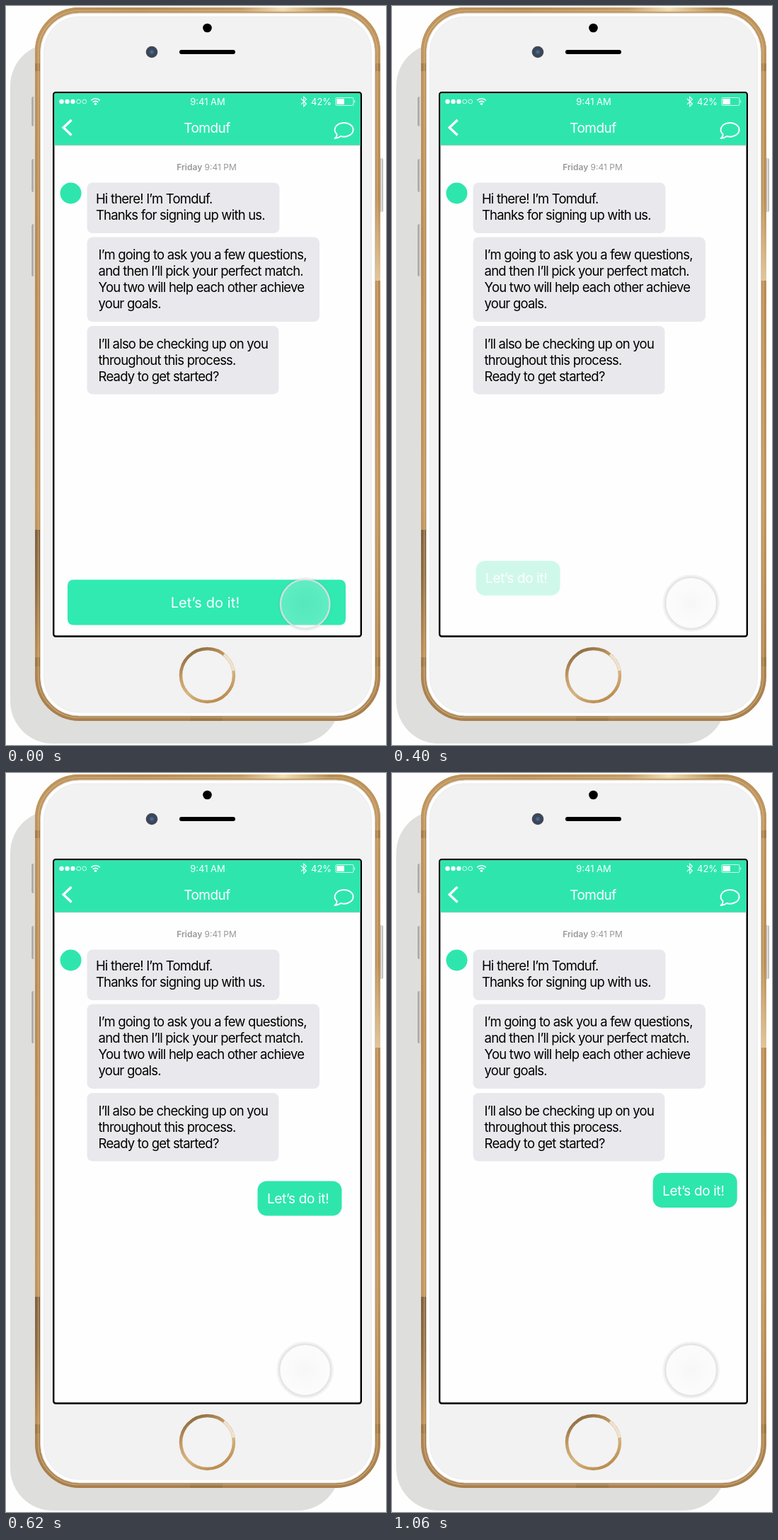
An HTML page for the animation above (2.4 s loop, 537 by 1044 pixels).

```html
<!DOCTYPE html>
<html lang="en">
<head>
<meta charset="utf-8">
<title>Chat reply</title>
<style>
  html, body { margin: 0; width: 100%; height: 100%; overflow: hidden; background: #fefefe; }
  svg { display: block; width: 537px; height: 1044px; }
  text { font: 18.5px Inter, "Open Sans", sans-serif; letter-spacing: -.79px; }
  .white { fill: #fff; }
  .line { fill: none; stroke: #fff; }
  .status { font-size: 13px; letter-spacing: 0; }
  .date { font-size: 12px; letter-spacing: 0; fill: #98989c; }
  .mid { text-anchor: middle; }
</style>
</head>
<body>
<svg viewBox="0 0 537 1044">
  <defs>
    <linearGradient id="gold" x2="0" y2="1">
      <stop offset="0" stop-color="#c0965f"/>
      <stop offset=".35" stop-color="#ba8c55"/>
      <stop offset=".7" stop-color="#c2965f"/>
      <stop offset="1" stop-color="#a87f4c"/>
    </linearGradient>
    <linearGradient id="top">
      <stop offset="0" stop-color="#c0965f"/>
      <stop offset=".3" stop-color="#b78c55"/>
      <stop offset=".6" stop-color="#c59d67"/>
      <stop offset=".72" stop-color="#f3e1b8"/>
      <stop offset=".86" stop-color="#b58c50"/>
      <stop offset="1" stop-color="#c0965f"/>
    </linearGradient>
    <linearGradient id="dark" x2="0" y2="1">
      <stop offset="0" stop-color="#80623f"/>
      <stop offset=".4" stop-color="#8f6d43"/>
      <stop offset="1" stop-color="#bd9058"/>
    </linearGradient>
    <linearGradient id="shine" x2="0" y2="1">
      <stop offset="0" stop-color="#f3dfb8" stop-opacity="0"/>
      <stop offset="1" stop-color="#f3dfb8" stop-opacity=".7"/>
    </linearGradient>
    <linearGradient id="metal">
      <stop offset="0" stop-color="#8c8c8c"/>
      <stop offset=".6" stop-color="#e2e2e2"/>
      <stop offset="1" stop-color="#aaa"/>
    </linearGradient>
    <linearGradient id="ring" x1=".2" y1="0" x2=".7" y2="1">
      <stop offset="0" stop-color="#89683f"/>
      <stop offset=".35" stop-color="#c49b63"/>
      <stop offset=".65" stop-color="#d6b582"/>
      <stop offset="1" stop-color="#b98b4d"/>
    </linearGradient>
    <radialGradient id="lens">
      <stop offset="0" stop-color="#57749b"/>
      <stop offset=".5" stop-color="#35465f"/>
      <stop offset="1" stop-color="#45484f"/>
    </radialGradient>
    <radialGradient id="glass">
      <stop offset="0" stop-color="#dcdcdc" stop-opacity=".22"/>
      <stop offset=".5" stop-color="#ececec" stop-opacity=".22"/>
      <stop offset="1" stop-color="#f6f6f6" stop-opacity=".25"/>
    </radialGradient>
  </defs>

  <!-- Phone -->
  <rect x="6" y="53" width="466" height="989" rx="60" fill="#dededd"/>
  <g fill="url(#metal)">
    <rect x="36.500" y="128" width="6" height="42" rx="2"/>
    <rect x="36.500" y="216" width="6" height="47" rx="2"/>
    <rect x="36.500" y="308" width="6" height="74" rx="2"/>
    <rect x="527" y="215" width="6" height="76" rx="2"/>
  </g>
  <rect x="41" y="2" width="488" height="1008" rx="62" fill="url(#gold)"/>
  <path d="M44 64A59 59 0 0 1 103 5H467A59 59 0 0 1 526 64" fill="none" stroke="url(#top)" stroke-width="6"/>
  <path d="M41 740h8v180h-8z" fill="url(#dark)"/>
  <path d="M521 270h8v118h-8z" fill="url(#shine)"/>
  <path d="M41 81h8v11h-8zM521 81h8v11h-8zM41 920h8v13h-8zM521 920h8v13h-8z" fill="#94703f" opacity=".55"/>
  <path d="M260 1003h46v7h-46z" fill="#94703f" opacity=".5"/>
  <rect x="45.500" y="6.500" width="479" height="999" rx="58" fill="none" stroke="#e0c498" stroke-width="1.200" opacity=".6"/>
  <rect x="48.500" y="10" width="473" height="993" rx="55" fill="#fff" stroke="#d5cbbb"/>
  <rect x="53.500" y="15" width="463" height="983" rx="50" fill="#f2f2f2" stroke="#ececec"/>
  <circle cx="284.500" cy="31" r="6.300"/>
  <circle cx="206" cy="65" r="8.300" fill="url(#lens)"/>
  <rect x="245" y="62" width="79" height="6" rx="3"/>
  <circle cx="284.500" cy="945.500" r="37.500" fill="#f3f3f3" stroke="url(#ring)" stroke-width="4.500"/>
  <path d="M308 916.300A37.500 37.500 0 0 1 321.500 939" fill="none" stroke="#eee3cf" stroke-width="4"/>

  <!-- Screen -->
  <rect x="67.200" y="122.200" width="434.600" height="768.300" rx="3" fill="#fefefe" stroke="#000" stroke-width="2.400"/>
  <rect x="68.400" y="123.400" width="432.200" height="73.600" fill="#2ee6ad"/>
  <path d="M68.400 196.700H500.600" stroke="#93c9b5"/>

  <g class="white">
    <circle cx="78.500" cy="135" r="3.200"/>
    <circle cx="86.500" cy="135" r="3.200"/>
    <circle cx="94.500" cy="135" r="3.200"/>
    <circle cx="126.500" cy="138.300" r="1.700"/>
    <rect x="467.500" y="131" width="10.500" height="8"/>
    <path d="M492.300 133q2.200 2 0 4z"/>
    <text class="status mid" x="285" y="140">9:41 AM</text>
    <text class="status" x="431" y="140">42%</text>
    <text class="mid" x="284" y="178.500" style="font-size:19px;letter-spacing:-.5px">Tomduf</text>
  </g>
  <g class="line">
    <circle cx="102.700" cy="135" r="2.900" stroke-width=".8"/>
    <circle cx="110.700" cy="135" r="2.900" stroke-width=".8"/>
    <path d="M120.300 133.300a8.800 8.800 0 0 1 12.400 0M122.800 135.800a5.300 5.300 0 0 1 7.400 0" stroke-width="1.700"/>
    <path d="M417 131l7.500 7-3.700 3.800v-13.600l3.700 3.600-7.500 7" stroke-width="1.100"/>
    <rect x="466" y="129.500" width="25" height="11" rx="1.500" stroke-width=".8"/>
    <path d="M92.500 161l-11.300 10.700 11.300 10.700" stroke-width="3.400"/>
    <path d="M467.500 181A13 9.800 0 1 1 473 184Q469 187 464.500 187Q468 184.500 467.500 181Z" stroke-width="1.900" stroke-linejoin="round"/>
  </g>

  <text class="date mid" x="283.500" y="232"><tspan font-weight="600">Friday</tspan> 9:41 PM</text>
  <circle cx="91.500" cy="264.500" r="15" fill="#2ee6ad"/>

  <g id="messages"></g>

  <rect id="button" x="87" y="810.500" width="393" height="64" rx="8" fill="#30eab2"/>
  <text id="label" class="white mid" x="281.500" y="850" style="font-size:20px;letter-spacing:.1px">Let’s do it!</text>

  <g id="reply">
    <rect width="119" height="49" rx="13" fill="#2de6ac"/>
    <text class="white" x="13.500" y="31.500" style="font-size:19px;letter-spacing:-.35px">Let’s do it!</text>
  </g>

  <g id="touch">
    <circle r="36.500" fill="none" stroke="#888c90" stroke-opacity=".1" stroke-width="5"/>
    <circle r="35.500" fill="url(#glass)" stroke="#e2e3e6" stroke-opacity=".85" stroke-width="2.300"/>
  </g>
</svg>

<script>
  const $ = id => document.getElementById(id);

  // Each message: top, width, height, text x, first baseline, lines
  const messages = [
    [249.5, 272, 71.5, 126.9, 279, ["Hi there! I’m Tomduf.", "Thanks for signing up with us."]],
    [326.5, 328.5, 119.5, 130.6, 357.7, ["I’m going to ask you a few questions,", "and then I’ll pick your perfect match.",
      "You two will help each other achieve", "your goals."]],
    [452, 271, 96.5, 130.6, 484.3, ["I’ll also be checking up on you", "throughout this process.", "Ready to get started?"]]
  ];
  $("messages").innerHTML = messages.map(([y, w, h, x, base, lines]) =>
    `<rect x="114.500" y="${y}" width="${w}" height="${h}" rx="8" fill="#e9e9ed"/>` +
    lines.map((line, i) => `<text x="${x}" y="${base + 23 * i}">${line}</text>`).join("")
  ).join("");

  const LOOP = 2400, SEND = 390;

  // The standard CSS "ease" curve, cubic-bezier(.25, .1, .25, 1)
  function ease(x) {
    if (x <= 0) return 0;
    if (x >= 1) return 1;
    let low = 0, high = 1, s;
    for (let i = 0; i < 20; i++) {
      s = (low + high) / 2;
      if (0.75 * s * (1 - s) + s ** 3 < x) low = s; else high = s;
    }
    return 0.3 * s * (1 - s) ** 2 + 3 * s * s * (1 - s) + s ** 3;
  }

  function draw(t) {
    $("button").style.opacity = 1 - (t / 481) ** 3;
    $("button").style.display = $("label").style.display = t < SEND ? "" : "none";

    // The reply appears in the button's corner and slows down into place
    const move = ease((t - 362) / 355);
    $("reply").setAttribute("transform", `translate(${87.5 + 281.2 * move} ${811 - 246 * move})`);
    $("reply").style.opacity = ease((t - 351) / 302);

    const press = Math.min(1, t / 400);
    $("touch").setAttribute("transform",
      `translate(422.700 ${845 - 1.5 * Math.min(1, t / 240)}) scale(${0.98 + 0.05 * press})`);
  }

  const start = performance.now();
  function tick() {
    draw((performance.now() - start) % LOOP);
    requestAnimationFrame(tick);
  }
  draw(0);
  requestAnimationFrame(tick);
</script>
</body>
</html>
```
